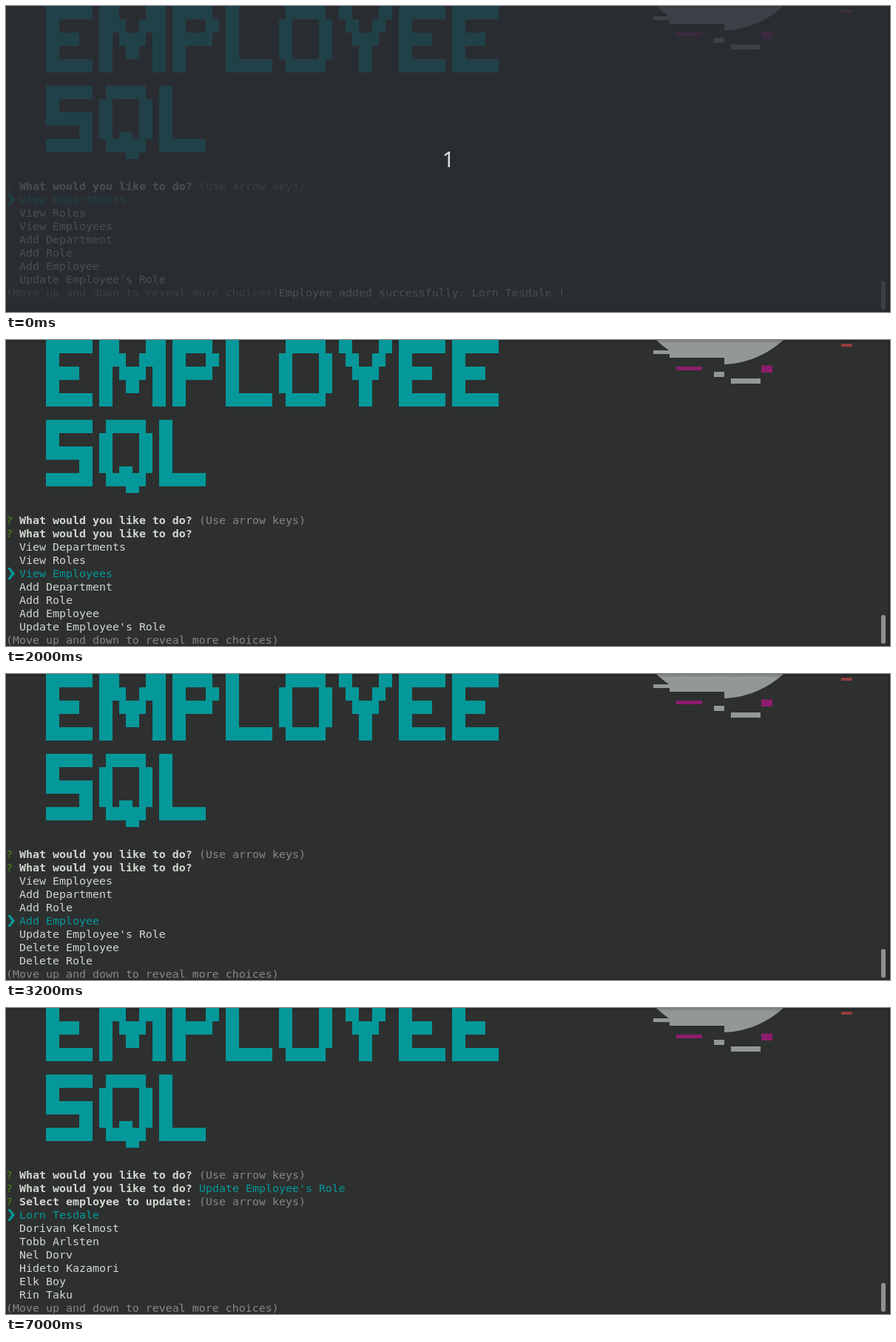
An HTML page for the animation above (8 s loop, 1195 px wide and 414 px high).

```html
<!DOCTYPE html>
<html lang="en">
<head>
<meta charset="utf-8">
<title>Employee SQL</title>
<style>
  html, body { margin: 0; width: 100%; height: 100%; overflow: hidden; background: #2d302f; }
  svg { display: block; width: 1195px; height: 414px; }
  text { white-space: pre; }
  #lines { font: 14.95px "DejaVu Sans Mono", monospace; }
  .bold { font-weight: bold; }
</style>
</head>
<body>
<svg viewBox="0 0 1195 414">
  <defs>
    <linearGradient id="shade" x2="0" y2="1">
      <stop offset="0" stop-color="#000" stop-opacity=".18"/>
      <stop offset="1" stop-color="#000" stop-opacity="0"/>
    </linearGradient>
  </defs>
  <rect width="1195" height="414" fill="#2d302f"/>
  <g fill="#939795">
    <path d="M879 0A128.6 128.6 0 0 0 896 14H875V19H897V24H971V33A128.6 128.6 0 0 0 1051 0Z"/>
    <path d="M957 43h14v7h-14zM980 52h40v7h-40z"/>
  </g>
  <path d="M906 36h35v5h-35zM1021 34.5h15v9.500h-15z" fill="#8d1d6c"/>
  <path d="M1129 5h15v4h-15z" fill="#933d3f"/>
  <rect width="1195" height="5" fill="url(#shade)"/>
  <path id="banner" fill="#05989a" fill-rule="evenodd"/>
  <g id="lines"></g>
  <rect x="1183" y="372" width="6" height="39" rx="3" fill="#8f918f"/>
  <g id="cover">
    <rect width="1195" height="414" fill="#282c34" fill-opacity=".8"/>
    <text x="598" y="218" text-anchor="middle" fill="#dcdddf" font-size="29" font-family="'Noto Sans', 'Open Sans', sans-serif">1</text>
  </g>
  <path d="M1192 0h3v414h-3zM0 413h1195v1H0z" fill="#232729"/>
</svg>
<script>
const LOOP = 8000, CELL = 9, ROW = 18;
const WHITE = '#d3d7cf', TEAL = '#05989a', GRAY = '#868885', GREEN = '#4e8a0c';
const $ = id => document.getElementById(id);

// Letter outlines in half-row cells, two cells per terminal row
const glyphs = {
  E: 'h7v2h-5v2h3v2h-3v2h5v2h-7z',
  M: 'h3v2h1v2h2v-2h1v-2h3v10h-2v-6h-1v2h-1v2h-2v-2h-1v-2h-1v6h-2z',
  P: 'h6v2h1v2h-1v2h-4v4h-2zm2 2v2h3v-2z',
  L: 'h2v8h5v2h-7z',
  O: 'm1 0h6v2h1v6h-1v2h-6v-2h-1v-6h1zm1 2v6h4v-6z',
  Y: 'h2v2h1v2h2v-2h1v-2h2v2h-1v2h-1v2h-1v4h-2v-4h-1v-2h-1v-2h-1z',
  S: 'h7v2h-5v2h5v6h-7v-2h5v-2h-5z',
  Q: 'm1 0h6v2h1v6h-1v2h-1v1h-2v-1h-3v-2h-1v-6h1zm1 2v6h1v-1h2v1h1v-6z'
};
const widths = { M: 10, O: 8, Y: 8, Q: 8 };

function word(letters, y) {
  let x = 6, d = '';
  for (const c of letters) {
    d += `M${x} ${y}${glyphs[c]}`;
    x += (widths[c] || 7) + 1;
  }
  return d;
}
$('banner').setAttribute('d', word('EMPLOYEE', 0) + word('SQL', 12));

const menu = ['View Departments', 'View Roles', 'View Employees', 'Add Department', 'Add Role',
  'Add Employee', "Update Employee's Role", 'Delete Employee', 'Delete Role', 'Exit'];
const people = ['Lorn Tesdale', 'Dorivan Kelmost', 'Tobb Arlsten', 'Nel Dorv',
  'Hideto Kazamori', 'Elk Boy', 'Rin Taku'];
const ASK = 'What would you like to do?', HINT = '(Use arrow keys)';
const MORE = '(Move up and down to reveal more choices)';

const put = (col, row, str, color, cls = '') =>
  `<text x="${col * CELL}" y="${249 + row * ROW}" fill="${color}" class="${cls}">${str}</text>`;

const question = (row, str, extra = '', color = GRAY) =>
  put(0, row, '?', GREEN) + put(2, row, str, WHITE, 'bold') + put(str.length + 3, row, extra, color);

const pointer = row =>
  `<path transform="translate(0 ${244 + row * ROW})" d="M2-8H5.500L12 0L5.500 8H2L7.500 0Z" fill="${TEAL}"/>`;

const list = (row, items, picked) =>
  items.map((s, i) => put(2, row + i, s, i === picked ? TEAL : WHITE)).join('') +
  pointer(row + picked) + put(0, row + items.length, MORE, GRAY);

const browse = (first, picked) =>
  question(0, ASK, HINT) + question(1, ASK) + list(2, menu.slice(first, first + 7), picked);

const start = () => question(0, ASK, HINT) + list(1, menu.slice(0, 7), 0) +
  put(MORE.length, 8, `Employee added successfully: ${people[0]} !`, WHITE);

const choose = () => question(-1, ASK, HINT) + question(0, ASK, menu[6], TEAL) +
  question(1, 'Select employee to update:', HINT) + list(2, people, 0);

const steps = [
  { at: 0, draw: start, dim: true },
  { at: 500, draw: start },
  { at: 2000, draw: () => browse(0, 2) },
  { at: 2400, draw: () => browse(0, 3) },
  { at: 2800, draw: () => browse(1, 3) },
  { at: 3200, draw: () => browse(2, 3) },
  { at: 4700, draw: () => browse(3, 3) },
  { at: 7000, draw: choose, lift: ROW }
];

let shown;
function render(t) {
  const step = steps.filter(s => s.at <= t).pop();
  if (step === shown) return;
  shown = step;
  $('lines').innerHTML = step.draw();
  $('banner').setAttribute('transform', `translate(0 ${-(step.lift || 0)}) scale(${CELL})`);
  $('cover').setAttribute('visibility', step.dim ? 'visible' : 'hidden');
}

const t0 = performance.now();
function tick() {
  render((performance.now() - t0) % LOOP);
  requestAnimationFrame(tick);
}
tick();
</script>
</body>
</html>
```
